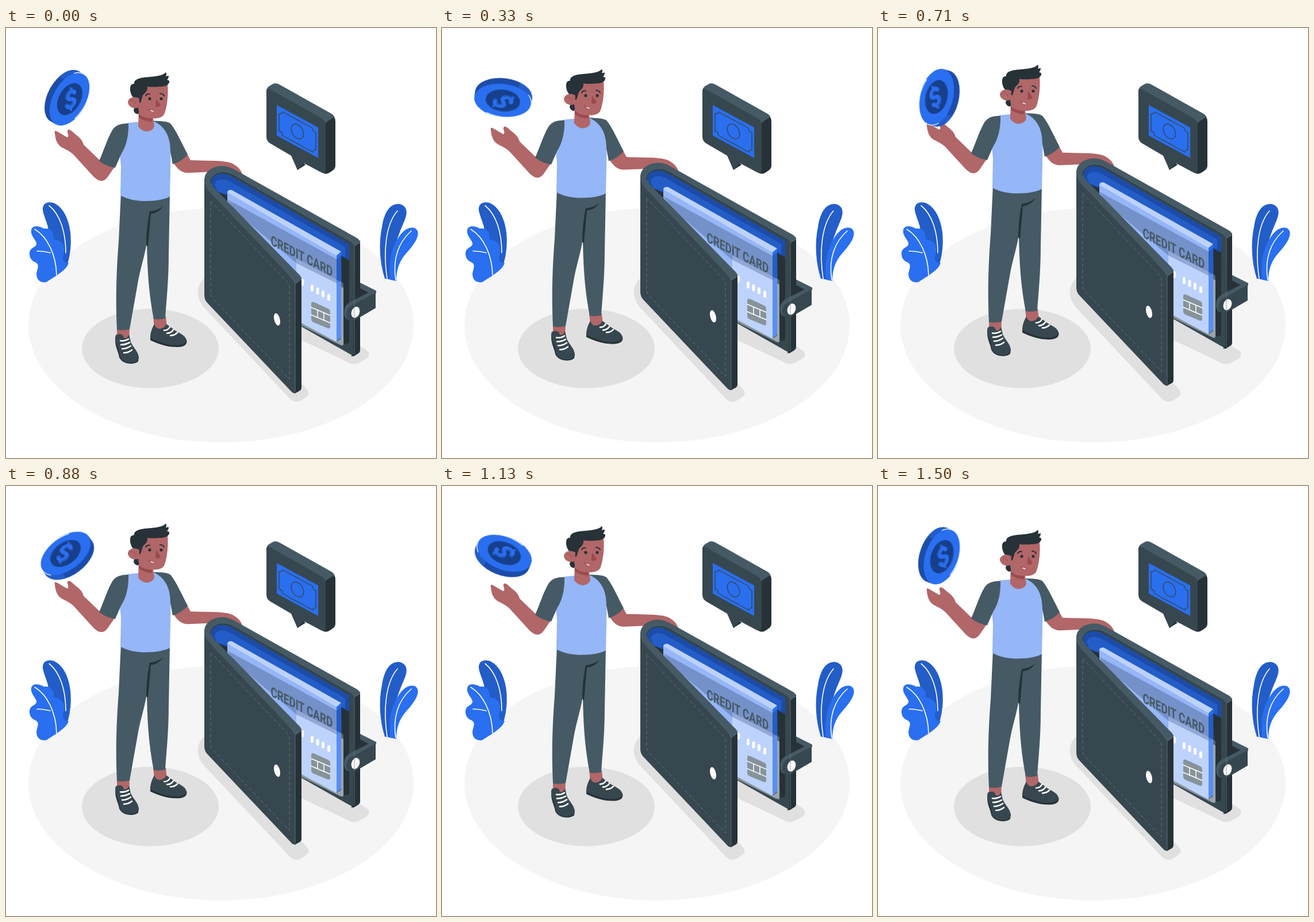
Recreate the animation shown at these times as an HTML page. Size 748 by 748 pixels, loop 1540 ms.

```html
<!DOCTYPE html>
<html lang="en">
<head>
<meta charset="utf-8">
<title>Wallet and coin</title>
<style>
html, body { margin: 0; height: 100%; overflow: hidden; background: #fff; }
svg { display: block; width: 100vw; height: 100vh; }
.bob { animation: bob 1540ms infinite; }
.spin { animation: spin 1540ms steps(37) infinite; }
@keyframes bob {
  0% { transform: translateY(0); animation-timing-function: steps(18); }
  48.65% { transform: translateY(-14px); animation-timing-function: steps(19); }
  100% { transform: translateY(0); }
}
@keyframes spin {
  from { transform: rotate(0deg); }
  to { transform: rotate(360deg); }
}
.blue { fill: #296ff0; }
.navy { fill: #235dc8; }
.deep { fill: #1c4ca8; }
.sky { fill: #95b6f7; }
.pale { fill: #bdd2fb; }
.ink { fill: #263238; }
.slate { fill: #37474f; }
.steel { fill: #455a64; }
.skin { fill: #b16668; }
.shade { fill: #9a4a4d; }
.floor { fill: #f5f5f5; }
.shadow { fill: #e0e0e0; }
.white { fill: #fafafa; }
.line, .dark, .print { fill: none; stroke-linecap: round; stroke-linejoin: round; }
.line { stroke: #fff; }
.dark { stroke: #263238; }
.print { stroke: #37474f; stroke-width: 1.4; }
text { font-family: Roboto, Inter, sans-serif; font-weight: 700; }
</style>
</head>
<body>
<svg viewBox="0 0 748 748">
  <!-- ground -->
  <ellipse class="floor" cx="374" cy="517" rx="335" ry="204"/>
  <ellipse class="shadow" cx="251" cy="557.5" rx="119" ry="69"/>
  <path class="shadow" d="M346 434C334 445 331 459 336 472C339 480 343 485 348 490L493 644Q503 655 515 647L521 643Q531 636 523 628L514 618V543L596 582Q604 587 613 583L626 576Q636 568 628 561L614 552L500 480Z"/>

  <!-- plants -->
  <path class="navy" d="M64 317C63 306 71 301 82 304C98 310 109 330 112 356C114 376 112 393 107 411L90 425L70 362C80 352 67 334 64 317Z"/>
  <path class="line" stroke-width="1.6" d="M75 309C94 324 104 355 104 391"/>
  <path class="blue" d="M44 351C46 343 57 344 66 349C77 347 84 355 83 368C97 369 104 379 101 391C97 402 99 409 109 409C105 419 97 424 89 430L70 442C60 444 53 438 53 428C54 419 60 411 50 407C42 404 39 394 42 387C45 381 54 381 53 374C50 366 42 360 44 351Z"/>
  <path class="line" stroke-width="1.6" d="M50 350C73 364 87 395 88 430M54 388Q66 388 77 391"/>
  <path class="navy" d="M659 436C650 408 648 375 654 346C658 321 667 306 683 306C696 308 700 318 694 333C688 348 678 369 677 385L672 438Z"/>
  <path class="blue" d="M668 438C665 405 671 380 685 361C693 350 703 345 711 348C719 352 718 362 711 373C701 389 689 396 683 414Q679 425 679 440Z"/>
  <path class="line" stroke-width="1.6" d="M681 318C660 342 656 390 663 436M705 353C683 372 672 402 678 438"/>

  <!-- speech bubble -->
  <path class="steel" d="M453 111Q453 104 458 101L464 97.500Q469 95 475 98L566 149Q573 153 571 160L555 171Z"/>
  <path class="ink" d="M554 170Q555 165 560 162L571 155Q573 158 573 163V239Q573 245 568 248L562 252Q556 255 551 252Z"/>
  <path class="ink" d="M507 247L521 238L512 229L500 229Z"/>
  <path class="slate" d="M453 110Q453 103 460 107L549 157Q556 161 556 170V246Q556 255 548 251L518 235L507 247L496 222L460 201Q453 197 453 189Z"/>
  <path class="blue" d="M471 134L543 173V226L471 187Z"/>
  <path class="print" d="M481 146L533 174Q533 180 539 182V212Q534 212 534 216L481 187Q481 181 475 179V149Q480 150 481 146Z"/>
  <ellipse class="print" rx="9.500" ry="14" transform="translate(507 180) rotate(-30)"/>

  <g class="bob">
    <!-- arms -->
    <path class="skin" d="M162 229L135 203C132 191 122 187 114 179C109 175 106 177 107 182C109 187 109 190 106 190L89 180C85 178 84 179 85 184C86 193 88 201 96 207C105 212 113 215 119 222L150 256C160 267 169 270 177 259L190 240Z"/>
    <path class="skin" d="M291 234C298 245 304 251 315 252L365 250L411 254C408 245 401 239 392 235C383 232 371 231 362 231L321 230L314 217Z"/>

    <!-- feet and trousers -->
    <path class="skin" d="M193 521H215L214 545L200 548L193 538ZM256 502H278L280 523L265 530L258 521Z"/>
    <path class="ink" d="M190 543C190 556 196 564 197 573C202 585 222 587 230 580L231 572ZM251 535V543C266 550 282 556 301 555C311 554 316 550 314 542Z"/>
    <path class="slate" d="M191 534Q203 529 205 539Q211 541 214 533L217 546C221 556 230 562 231 573C229 584 212 585 201 577C196 572 199 562 193 552Q188 542 191 534ZM258 515Q261 524 268 523Q276 522 279 515L290 523C299 531 313 533 314 544C311 553 293 553 280 550C269 546 260 545 251 539C251 528 255 521 258 515Z"/>
    <path class="line" stroke-width="2.600" d="M199 544Q207 545 213 541M200 551Q208 551 215 547M202 558Q210 558 217 553M205 565Q213 565 219 560M275 526Q282 526 285 520M280 531Q287 531 291 525M286 535Q293 535 298 530"/>
    <path class="steel" d="M200 286L285 288L283 395C283 438 279 475 277 505Q267 508 257 506C250 469 246 435 245 372C242 395 233 420 229 445L215 524Q204 527 193 525C190 465 193 410 196 372Z"/>
    <path class="ink" d="M274 309Q264 318 250 319Q244 347 244 378L247 380L252 323Q266 322 274 309Z"/>

    <!-- shirt -->
    <path class="sky" d="M212 165L233 163L258 161L275 164L287 190L286 250L285 293C272 302 222 306 199 291L200 240L198 220Z"/>
    <path class="steel" d="M213 166Q194 165 186 176C176 192 170 214 162 231Q175 241 190 243L200 220Q214 198 213 166ZM256 162Q277 161 286 166C296 178 306 201 316 220Q306 232 290 237L286 215C286 188 276 170 256 162Z"/>
    <path class="skin" d="M231 142L230 171Q236 180 246 180Q257 178 258 170L255 151Z"/>
    <path class="shade" d="M231 149Q239 158 255 157L254 163Q239 162 231 155Z"/>

    <!-- head -->
    <path class="ink" d="M222 143Q223 149 230 150L236 135H224Z"/>
    <path class="skin" d="M232 104L281 97C283 115 280 137 276 148C272 160 253 158 240 155Q231 151 230 140Z"/>
    <path class="ink" d="M224 123C217 119 214 106 217 100Q219 97 223 97C222 88 236 86 251 85C264 84 274 82 278 77Q280 80 278 84L283 83Q283 88 280 90Q285 91 284 94Q282 102 267 102Q255 103 246 102C247 110 241 113 238 117L234 130L226 130Z"/>
    <path class="skin" d="M232 123C225 118 214 120 212 128C212 137 222 142 231 138Z"/>
    <path fill="none" stroke="#9a4a4d" d="M217 126Q223 125 226 132"/>
    <path class="shade" d="M261 123L269 134Q268 138 260 137Z"/>
    <circle class="ink" cx="250" cy="123" r="2.600"/>
    <circle class="ink" cx="270" cy="123" r="2.600"/>
    <path class="dark" stroke-width="2" d="M243 118Q245 114 250 115M268 114Q273 114 275 118"/>
    <path class="shade" d="M247 139Q249 146 257 146L256 143Q251 143 247 139Z"/>
    <path class="line" stroke-width="1.600" d="M252 143.500L256 145"/>

    <!-- wallet, back cover -->
    <path class="slate" d="M352 268C352 245 380 242 399 251L609 370L605 571L506 515L366 290Z"/>
    <path class="ink" d="M606 377L616 370V561Q616 564 613 566L605 571H600L604 567ZM583 393L597 401V545Q596 551 588 549Z"/>
    <path class="ink" d="M362 278L392 285V308H380Z"/>
    <path class="deep" d="M357 268C358 252 378 250 392 258L597 376V404L583 397L390 285L383 291L366 284Q358 277 357 268Z"/>
    <path class="navy" d="M363 273C365 262 379 260 391 268L590 381V399L391 285L384 290L368 284Z"/>

    <!-- card -->
    <path class="sky" d="M385 286L391 282L582 389L575 396V546L505 510L385 303Z"/>
    <path class="pale" d="M385 286Q386 281 393 282L583 389L575 396Z"/>
    <path class="blue" d="M575 396L583 389V538L575 545Z"/>
    <path fill="#abc6fa" d="M505 403L575 439V546L505 510Z"/>
    <path fill="#7591c9" d="M385 298L575 402V444L505 409L400 320Z"/>
    <path fill="#235dc8" d="M575 402L583 396V440L575 444Z"/>
    <path fill="#7e8d98" d="M575 546L583 541V450L587 452V549Q586 554 580 551L514 518V513Z"/>
    <path fill="#fff" opacity=".22" d="M505 401L587 444V553L505 510Z"/>
    <text fill="#455a64" font-size="24" transform="matrix(.72 .374 0 1 460.500 377)">CREDIT CARD</text>
    <path class="line" stroke-width="5" d="M515.500 439V446M532.500 449V456M542 454V461M551.500 459V466M561.500 465V472"/>
    <path fill="#87939a" d="M531 480Q531 475 536 477L560 488Q564 490 564 494V519Q564 524 559 522L535 512Q531 510 531 506Z"/>
    <path class="line" stroke-width="1.500" d="M531 486L564 500M531 499L564 513M542 491V504M553 496V509"/>

    <!-- strap -->
    <path class="slate" d="M616 445L643 458V487L616 503V460Z"/>
    <path class="ink" d="M616 453L631 461L616 469Z"/>
    <path class="steel" d="M616 443L644 457V461L600 484C593 488 592 500 597 508Q588 507 588 494Q588 483 598 477L631 460L616 452Z"/>
    <path class="slate" d="M643 460V487L613 504C604 512 592 510 592 498Q593 487 601 483Z"/>
    <ellipse class="white" rx="7" ry="10" transform="translate(608 494.500) rotate(20)"/>

    <!-- wallet, front cover -->
    <path class="ink" d="M502 444L514 434V625Q514 629 511 631L502 636Z"/>
    <path class="slate" d="M345 262L357 282L497 435Q503 441 503 448V635Q499 636 495 631L351 479Q345 473 345 465Z"/>
    <path class="steel" d="M345 267C344 249 360 239 379 240Q389 241 399 247L610 365Q616 369 616 373L606 379Q605 376 601 374L395 256C379 247 358 253 357 267Q358 276 367 283L508 427Q514 432 514 437L503 445Q502 440 498 436L357 288Q347 278 345 267Z"/>
    <path fill="none" stroke="#71818a" stroke-width=".7" d="M503 445V633M503 445L514 437M606 379V568M606 379L616 373"/>
    <path fill="none" stroke="#263238" stroke-width="1" d="M356 270C355 254 376 246 396 257L601 374"/>
    <path fill="none" stroke="#62727a" stroke-width="1" stroke-dasharray="6 4" d="M356 303V461Q356 467 361 472L493 611V451Q493 446 489 442L356 301"/>
    <ellipse class="white" rx="5" ry="11" transform="translate(471.500 507) rotate(-14)"/>
  </g>

  <!-- coin -->
  <g transform="translate(106.500 121.300)">
    <g class="spin">
      <g transform="rotate(29)">
        <path class="deep" d="M-5-50A29 50 0 0 0-5 50H5V-50Z"/>
        <path class="navy" d="M-5-50A29 50 0 0 0-30-25L-20-25L5-50Z"/>
        <ellipse class="blue" cx="5" rx="29" ry="50"/>
        <path class="line" stroke-width="1.200" d="M-10-43Q-3-51 8-49.500C24-47 33-24 33.500-2Q33 14 29 25"/>
        <ellipse fill="#173f8b" cx="5" rx="19" ry="30"/>
        <path class="deep" d="M5 30A19 30 0 0 0 5-30A16 28 0 0 1 5 30Z"/>
      </g>
      <g text-anchor="middle" font-size="43">
        <text class="navy" transform="matrix(.866 -.5 0 1 4.500 17)">$</text>
        <text class="blue" transform="matrix(.866 -.5 0 1 7 18.500)">$</text>
      </g>
    </g>
  </g>
</svg>
</body>
</html>
```
